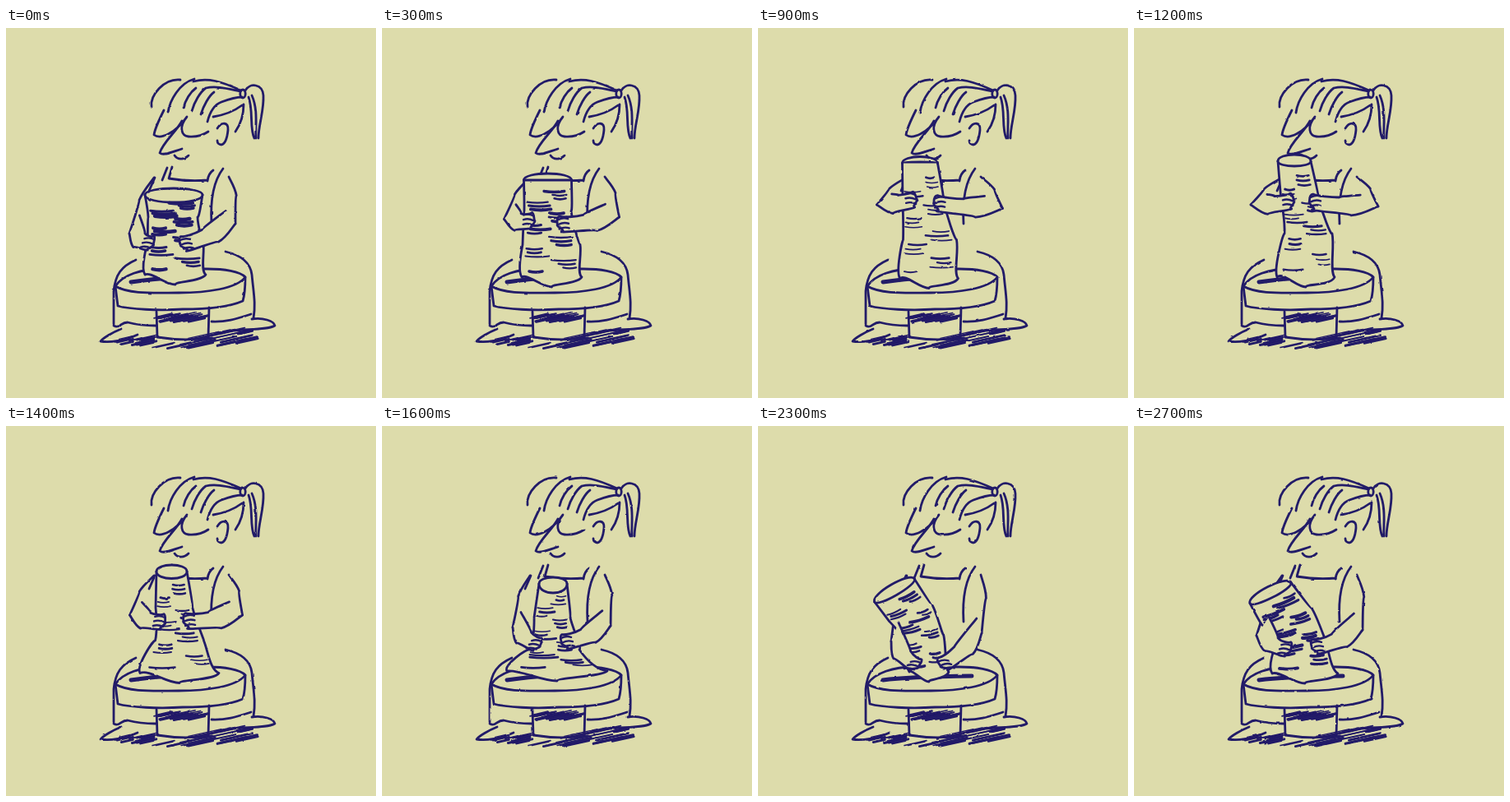
Recreate the animation shown at these times as an HTML page. Size 450 by 450 pixels, loop 2800 ms.

```html
<!DOCTYPE html>
<html lang="en">
<head>
<meta charset="utf-8">
<title>Potter at the wheel</title>
<style>
html, body { margin: 0; width: 100%; height: 100%; overflow: hidden; background: #dddcab; }
svg { display: block; width: 450px; height: 450px; }
#ink { fill: none; stroke: #211a68; stroke-width: 2.8; stroke-linecap: round; stroke-linejoin: round; }
.solid { fill: #dddcab; }
</style>
</head>
<body>
<svg viewBox="0 0 450 450">
  <filter id="rough" filterUnits="userSpaceOnUse" x="0" y="0" width="450" height="450">
    <feTurbulence id="noise" type="fractalNoise" baseFrequency=".14"/>
    <feDisplacementMap in="SourceGraphic" scale="2.2" xChannelSelector="R" yChannelSelector="G"/>
  </filter>
  <g id="ink" filter="url(#rough)">
    <!-- hair -->
    <path d="M177 96C175 82 192 61 212 63M197 103C199 88 211 67 229 62M228 65C246 60 262 65 286 76M216 97C218 88 224 78 231 73M226 101C229 90 236 78 243 73C256 70 270 74 285 77M237 105C240 95 247 82 253 78M245 114C248 102 254 93 262 90C270 87 280 84 287 84M252 108C264 106 275 103 287 94M279 126C286 116 289 106 289 93"/>
    <ellipse cx="288" cy="80" rx="3.2" ry="5"/>
    <path d="M291 76C297 66 312 68 313 82C314 100 307 118 307 134M295 84C301 100 296 122 302 134M299 82C307 100 303 120 304 134"/>
    <!-- face -->
    <path d="M192 100C187 110 181 122 180 130C188 136 206 128 220 108C210 120 213 131 222 132C232 133 240 130 246 126M214 113C208 125 190 140 187 152C192 156 204 150 214 147M205 155C209 161 217 160 222 155M257 122C262 114 271 114 270 124C269 134 266 141 262 142C259 142 257 140 257 137"/>
    <!-- apron -->
    <path d="M181 182L174 198M196 170L190 185M202 169L198 183Q222 187 245 185M245 186Q246 177 252 173M264 171C254 184 248 205 250 238"/>
    <!-- legs and feet -->
    <path d="M158 282C140 290 133 300 131 320V360M267 272C285 276 297 284 299 300C301 322 304 335 301 353M299 354C312 352 326 356 327 362C318 367 298 366 276 368M140 366C130 370 118 377 115 381C126 383 145 380 160 373M131 362C138 366 139 358 148 358Q163 362 182 362M250 357C270 358 285 352 298 348"/>
    <!-- wheel -->
    <path class="solid" d="M133 314C142 300 165 293 190 293H245C265 293 285 296 291 303C291 313 291 322 288 332C270 340 245 342 215 342C185 344 150 342 136 338Z"/>
    <path d="M133 314C150 324 180 322 210 322C245 322 280 317 291 303M183 345L184 376Q215 381 246 377L247 340"/>
    <g id="shadows"></g>
    <g id="pose"></g>
  </g>
</svg>
<script>
// clay: discs from rim to foot, each [x, y, half width]; arms: [elbow, hand].
// lean: tilt of the rim in degrees; lip: bulge of its near edge; ink: hatch weight.
const poses = [
  { at: 0, lean: 0, lip: 9, ink: 4, clay: [[204,203,35], [203,230,30], [206,262,34], [206,300,37]],
    left: [[150,250], [176,262]], right: [[279,238], [216,263]] },
  { at: 600, lean: 0, lip: -9, ink: 2.4, clay: [[199,167,23], [200,215,27], [206,265,36], [207,306,36]],
    left: [[147,215], [188,207]], right: [[298,222], [218,215]] },
  { at: 1200, lean: 0, lip: 6, ink: 2.6, clay: [[195,162,20], [202,210,23], [212,250,29], [209,303,35]],
    left: [[142,215], [191,211]], right: [[297,217], [217,212]] },
  { at: 1600, lean: 0, lip: 11, ink: 2.5, clay: [[208,192,17], [207,233,22], [210,272,30], [213,298,61]],
    left: [[159,245], [189,266]], right: [[278,243], [222,263]] },
  { at: 2000, lean: 0, lip: 12, ink: 2.6, clay: [[225,199,24], [214,227,51], [217,265,41], [216,300,24]],
    left: [[162,262], [191,293]], right: [[276,250], [226,291]] },
  { at: 2300, lean: -30, lip: 6, ink: 3, clay: [[166,200,28], [186,228,28], [202,258,24], [208,299,24]],
    left: [[162,262], [192,291]], right: [[272,252], [225,290]] },
  { at: 2700, lean: -27, lip: 6, ink: 3.8, clay: [[166,203,28], [186,232,32], [203,262,29], [208,301,40]],
    left: [[149,255], [187,272]], right: [[278,248], [220,269]] }
];
const LOOP = 2800, STEP = 100;
const byId = id => document.getElementById(id);

const mix = (a, b, k) => Array.isArray(a) ? a.map((v, i) => mix(v, b[i], k)) : a + (b - a) * k;
const add = (p, v, k = 1) => [p[0] + v[0] * k, p[1] + v[1] * k];
const random = n => { const v = Math.sin(n * 12.9898) * 43758.5453; return v - Math.floor(v); };
const stroke = (d, width) => `<path d="${d}" stroke-width="${width}"/>`;
const solid = d => `<path class="solid" d="${d}"/>`;

// Smooth curve through all points
function curve(points) {
  const p = i => points[Math.max(0, Math.min(points.length - 1, i))];
  let d = `M${p(0)}`;
  for (let i = 0; i < points.length - 1; i++) {
    const [a, b, c, e] = [p(i - 1), p(i), p(i + 1), p(i + 2)];
    d += `C${add(b, mix(a, c, .5), 1 / 3).map((v, j) => v - b[j] / 3 + (b[j] - (a[j] + c[j]) / 2) * 0)} ` +
         `${c.map((v, j) => v - (e[j] - b[j]) / 6)} ${c}`;
  }
  return d.replace(/NaN/g, 0);
}

// Loose parallel pen strokes filling a patch
function scribble(x, y, width, height, count) {
  let out = '';
  for (let i = 0; i < count; i++) {
    const across = random(i + x), down = random(i + y);
    const length = width * (.25 + .25 * random(i + width));
    out += stroke(`M${x + across * (width - length)} ${y + down * height}l${length} ${-length * .22}`, 1.2 + down * 2);
  }
  return out;
}

// Point on a disc, u from -1 (left edge) to 1 (right edge)
function onDisc([x, y, half], angle, u) {
  return [x + Math.cos(angle) * half * u, y + Math.sin(angle) * half * u];
}

function drawClay({ clay, lean, lip, ink }, seed) {
  const angle = k => lean * (1 - k) * Math.PI / 180;
  const edge = u => clay.map((disc, i) => onDisc(disc, angle(i / 3), u));
  const left = edge(-1), right = edge(1), foot = clay[3];
  const rimArc = bulge => {
    const up = [Math.sin(angle(0)) * bulge * 4 / 3, -Math.cos(angle(0)) * bulge * 4 / 3];
    return solid(`M${left[0]}C${add(left[0], up)} ${add(right[0], up)} ${right[0]}`);
  };
  let out = solid(curve([...left, [foot[0], foot[1] + 12], ...right.reverse()]));
  right.reverse();
  out += rimArc(8) + rimArc(-lip);

  const count = 22;
  for (let i = 0; i < count; i++) {
    const k = .12 + .86 * i / count, level = Math.min(2, Math.floor(k * 3));
    const disc = mix(clay[level], clay[level + 1], k * 3 - level);
    const r = random(i + seed * 31), length = .4 + .5 * random(i * 3 + seed);
    const start = Math.floor(i / 3) % 2 ? -.92 + r * .2 : .85 - length - r * .2;
    const from = onDisc(disc, angle(k), start), to = onDisc(disc, angle(k), start + length);
    out += stroke(`M${from}Q${add(mix(from, to, .5), [0, 2])} ${to}`, ink * (.6 + .6 * r));
  }
  return out;
}

// side: 1 for the left arm, -1 for the right
function arm(shoulder, [elbow, hand], side) {
  const reach = add(hand, elbow, -1), length = Math.hypot(...reach);
  const out = [-reach[1] * side / length, reach[0] * side / length];
  const upper = add(mix(shoulder, elbow, .4), [-6 * side, 0]);
  const low = add(hand, out, 9), high = add(hand, out, -10);
  const fingers = [.2, .5, .8].map(k => {
    const [x, y] = add(mix(low, high, k), reach, 2 / length);
    return `M${x} ${y}q${-6 * side} -3 ${-12 * side} -1`;
  }).join('');
  return {
    behind: stroke(curve([shoulder, upper, elbow]), 2.8),
    front: solid(curve([elbow, add(mix(elbow, hand, .4), out, 13), low, add(hand, reach, 4 / length), high,
      add(mix(elbow, hand, .6), out, -8), add(mix(elbow, upper, .6), reach, .2)])) + stroke(fingers, 2.4)
  };
}

function draw(time) {
  let i = poses.length - 1;
  while (poses[i].at > time) i--;
  const a = poses[i], b = poses[(i + 1) % poses.length];
  const k = (time - a.at) / ((b.at || LOOP) - a.at);
  const now = {};
  for (const key in a) now[key] = mix(a[key], b[key], k);

  const left = arm([180, 182], now.left, 1), right = arm([271, 181], now.right, -1);
  byId('noise').setAttribute('seed', i + 1);
  byId('pose').innerHTML = stroke(`M152 309Q180 305 ${200 - now.lean * 2} 304`, 5) +
    left.behind + right.behind + drawClay(now, i + 1) + left.front + right.front;
}

byId('shadows').innerHTML = scribble(180, 350, 66, 8, 22) + scribble(132, 378, 56, 8, 16) +
  scribble(178, 388, 75, 2, 8) + scribble(205, 377, 102, 10, 15) + scribble(254, 368, 46, 4, 8);

let shown = -1;
function tick() {
  const time = Math.floor(performance.now() % LOOP / STEP) * STEP;
  if (time !== shown) draw(shown = time);
  requestAnimationFrame(tick);
}
tick();
</script>
</body>
</html>
```
